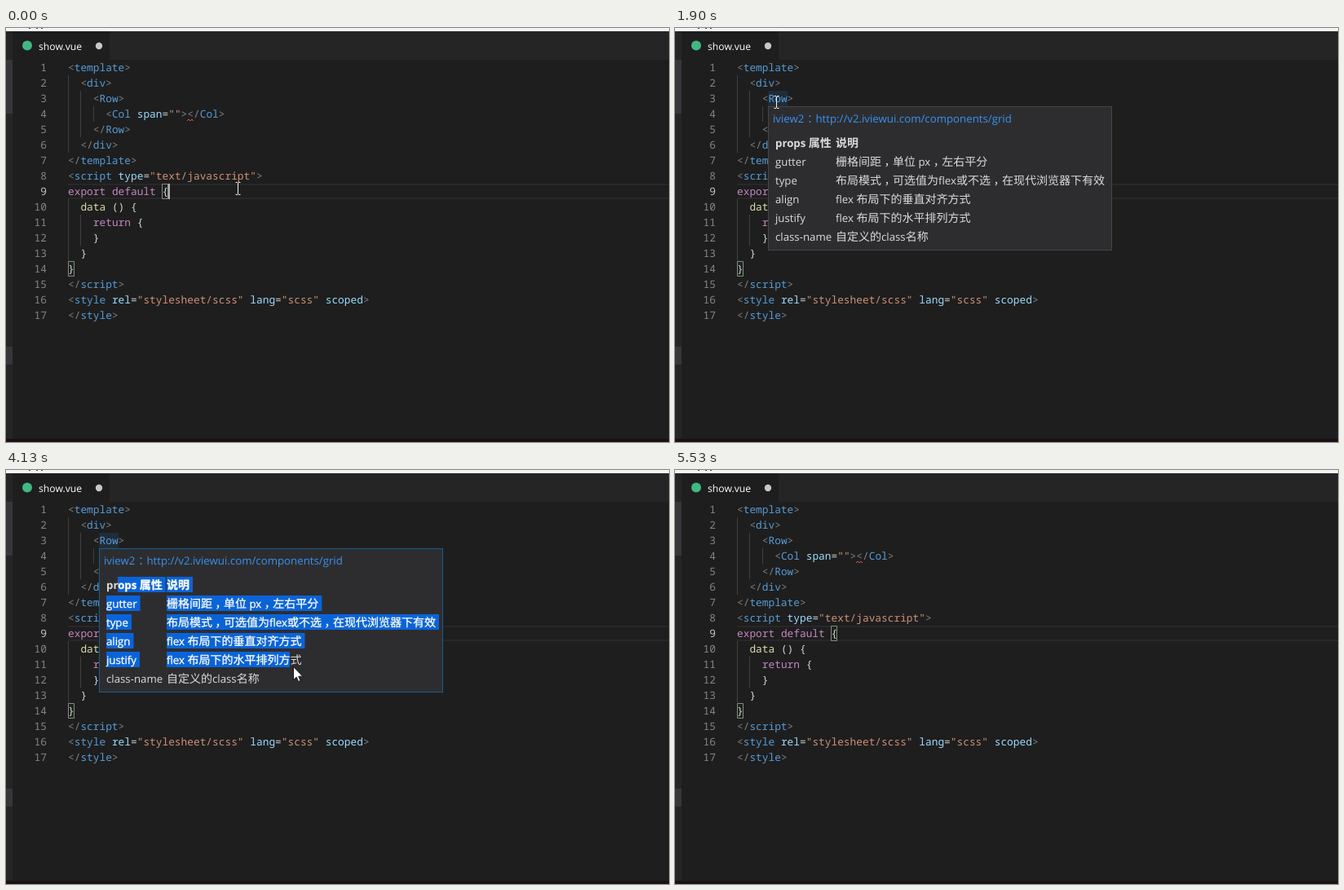
These frames come from a looping animation (813 by 508 pixels, 5.8 s). An HTML page:

```html
<!DOCTYPE html>
<html lang="zh-CN">
<head>
<meta charset="utf-8">
<title>show.vue</title>
<style>
  html, body { margin: 0; width: 100%; height: 100%; overflow: hidden; background: #1e1e1e; }
  svg { display: block; width: 100vw; height: 100vh; }
  text { white-space: pre; text-rendering: geometricPrecision; }
  .code { font: 12.833px 'Noto Sans Mono', monospace; }
  .ui { font-family: 'Open Sans', sans-serif; font-size: 13.25px; }
  .cjk { font-family: 'Noto Sans CJK SC', 'Noto Sans CJK', sans-serif; font-size: 14px; }
</style>
</head>
<body>
<svg id="stage" viewBox="0 0 813 508" xmlns="http://www.w3.org/2000/svg">
  <defs><clipPath id="pickClip"><path id="pickShape"/></clipPath></defs>

  <rect width="813" height="508" fill="#1e1e1e"/>
  <rect width="813" height="39" fill="#252526"/>
  <rect x="8" y="4" width="119" height="35" fill="#1e1e1e"/>
  <rect y="4" width="8" height="500" fill="#252526"/>
  <path d="M0 39h8v66h-8zM0 391h8v22h-8z" fill="#37373a"/>
  <rect width="813" height="4" fill="#f2f7f5"/>
  <path d="M28 0h2v1h-2zM37 0h2v1h-2zM43 0h2v1h-2z" fill="#444"/>
  <rect y="504" width="813" height="4" fill="#1a1116"/>

  <circle cx="26" cy="21.5" r="6" fill="#41b883"/>
  <text class="ui" x="40" y="27" fill="#fff" style="font-size:12.2px">show.vue</text>
  <circle cx="114" cy="22" r="4.2" fill="#c8c8c8"/>

  <path d="M76 192H813M76 209H813" stroke="#282828" stroke-width="2"/>
  <g id="guides" fill="#404040"></g>
  <path d="M191.5 191.5h7v18h-7zM76.5 286.5h7v18h-7z" fill="#1c251c" stroke="#888"/>
  <rect id="wordMark" x="114" y="77" width="24" height="19" fill="#264f78" fill-opacity=".3"/>
  <g id="code" class="code"></g>
  <path d="M222 114l2-2 2 2 2-2 2 2" fill="none" stroke="#e05050"/>
  <rect id="caret" x="199" y="191" width="2" height="19" fill="#aeafad"/>

  <g id="popup" class="ui">
    <rect id="frame" x="114.5" y="96.5" width="421" height="176" fill="#2d2d30"/>
    <g id="docs" fill="#dcdcdc"></g>
    <g clip-path="url(#pickClip)">
      <rect x="114" y="96" width="422" height="177" fill="#0a64d8"/>
      <g id="docsPicked" fill="#fff" stroke="#fff" stroke-width=".3"></g>
    </g>
  </g>

  <path id="beam" d="M.5 .5H3M4 .5H6.5M3.5 1V15M.5 15.5H3M4 15.5H6.5" fill="none" stroke="#f4f4f4"/>
  <path id="arrow" d="M.5 .5V16.6L4.2 13.1 6.6 18.5 9 17.5 6.7 12.2H11.7Z" fill="#fff" stroke="#111" stroke-width=".9"/>
</svg>
<script>
const LOOP = 5800, STEP = 140;
const CHAR = 7.7, LEFT = 76, LINE = 19;
const ROW = 23, ROW_TOP = 131, EM = 14;
const $ = id => document.getElementById(id);

function add(parent, tag, attrs, content) {
  const el = document.createElementNS('http://www.w3.org/2000/svg', tag);
  for (const key in attrs) el.setAttribute(key, attrs[key]);
  if (content !== undefined) el.textContent = content;
  return parent.appendChild(el);
}

const source = `<template>
  <div>
    <Row>
      <Col span=""></Col>
    </Row>
  </div>
</template>
<script type="text/javascript">
export default {
  data () {
    return {
    }
  }
}
<\/script>
<style rel="stylesheet/scss" lang="scss" scoped>
</style>`;

function tokenColor(token, before) {
  if (/^[<>]/.test(token)) return '#808080';
  if (token[0] === '"') return '#ce9178';
  if (/^(export|default|return)$/.test(token)) return '#c586c0';
  if (token === 'data') return '#dcdcaa';
  if (/<\/?$/.test(before)) return '#569cd6';
  return /\w/.test(token) ? '#9cdcfe' : '#d4d4d4';
}

source.split('\n').forEach((line, i) => {
  const top = 39 + i * LINE, y = top + 14;
  for (let col = 0; col < line.search(/\S/); col += 2)
    add($('guides'), 'rect', { x: Math.round(LEFT + col * CHAR), y: top, width: 1, height: LINE });
  add($('code'), 'text', { x: 50, y, 'text-anchor': 'end', fill: i === 8 ? '#c6c6c6' : '#858585' }, i + 1);
  for (const { 0: token, index } of line.matchAll(/"[^"]*"|<\/?|>|\w+|[^\s\w]/g))
    add($('code'), 'text', { x: LEFT + index * CHAR, y, fill: tokenColor(token, line.slice(0, index)) }, token);
});

// Latin and CJK runs differ in font and size; wide punctuation is centred in its box.
function mixedText(parent, x, y, string, attrs) {
  const text = add(parent, 'text', { x, y, ...attrs });
  let shift = 0;
  for (const [run] of string.matchAll(/[，：]|[\u3000-\u9fff]+|[^\u3000-\uffff]+/g)) {
    const next = /[，：]/.test(run) ? 3.5 : 0;
    add(text, 'tspan', { dx: next - shift, class: run[0] >= '\u3000' ? 'cjk' : '' }, run);
    shift = next;
  }
  return text;
}

const docs = [
  ['props 属性', '说明'],
  ['gutter', '栅格间距，单位 px，左右平分'],
  ['type', '布局模式，可选值为flex或不选，在现代浏览器下有效'],
  ['align', 'flex 布局下的垂直对齐方式'],
  ['justify', 'flex 布局下的水平排列方式'],
  ['class-name', '自定义的class名称']
];
mixedText($('docs'), 120, 116, 'iview2：http://v2.iviewui.com/components/grid', { fill: '#3a92ee' });

const cells = docs.flatMap((pair, row) => pair.map((string, col) => {
  const x = col ? 197 : 123, y = ROW_TOP + 15 + row * ROW;
  const style = row ? {} : { 'font-weight': 700 };
  mixedText($('docsPicked'), x, y, string, style);
  const text = mixedText($('docs'), x, y, string, style);
  return { row, x, end: x + text.getComputedTextLength() + 4 };
}));

// Pointer strokes: time span, goal and an optional point the path bends towards.
const strokes = [
  { span: [460, 1440], to: [121, 83], bend: [130, 160] },
  { span: [2440, 2580], to: [127, 120] },
  { span: [2580, 3000], to: [233, 205], bend: [150, 190] },
  { span: [3000, 3240], to: [168, 162] },
  { span: [3240, 3390], to: [141, 152] },
  { span: [3390, 3700], to: [284, 231], bend: [164, 145] },
  { span: [3700, 4130], to: [352, 241] },
  { span: [4430, 4580], to: [374, 233] },
  { span: [5110, 5260], to: [417, 267] },
  { span: [5260, 5410], to: [730, 488] }
];

const smooth = p => p * p * (3 - 2 * p);

// The screen refreshes in steps, so each stroke advances in equal jumps.
function pointer(t) {
  let pos = [281, 189];
  for (const { span: [start, end], to, bend } of strokes) {
    if (t < start) break;
    const steps = Math.round((end - start) / STEP);
    const u = smooth(Math.min(1, Math.floor((t - start) / (end - start) * steps) / steps));
    pos = pos.map((from, i) => {
      const mid = bend ? bend[i] : (from + to[i]) / 2;
      return Math.round(from * (1 - u) ** 2 + 2 * mid * u * (1 - u) + to[i] * u * u);
    });
  }
  return pos;
}

// Highlight everything from the drag start to the character under the pointer.
function selection([px, py]) {
  const row = Math.floor((py - ROW_TOP) / ROW);
  const edge = 222 + EM * Math.round((px - 222) / EM);
  return cells.map((cell, i) => {
    const from = i ? cell.x : 137;
    const to = cell.row === row ? Math.min(cell.end, edge) : cell.end;
    return cell.row > row || to <= from ? '' : `M${from} ${ROW_TOP + cell.row * ROW}H${to}v19H${from}z`;
  }).join('');
}

const show = (id, on) => $(id).setAttribute('visibility', on ? 'visible' : 'hidden');

function draw(t) {
  const pos = pointer(t);
  const open = t >= 1900 && t < 5410;
  const dragging = t >= 3540 && t < 4430;
  for (const id of ['popup', 'wordMark']) show(id, open);
  show('caret', t < 1900 && (t + 60) % 1000 < 500);
  show('beam', t < 2580);
  show('arrow', t >= 2580 && t < 5530);
  for (const id of ['beam', 'arrow']) $(id).setAttribute('transform', `translate(${pos})`);
  $('frame').setAttribute('stroke', t < 4130 ? '#454545' : '#195d8b');
  $('pickShape').setAttribute('d', dragging ? selection(pos) : 'M0 0');
}

let start;
function tick(now) {
  start ??= now;
  draw((now - start) % LOOP);
  requestAnimationFrame(tick);
}
draw(0);
requestAnimationFrame(tick);
</script>
</body>
</html>
```
